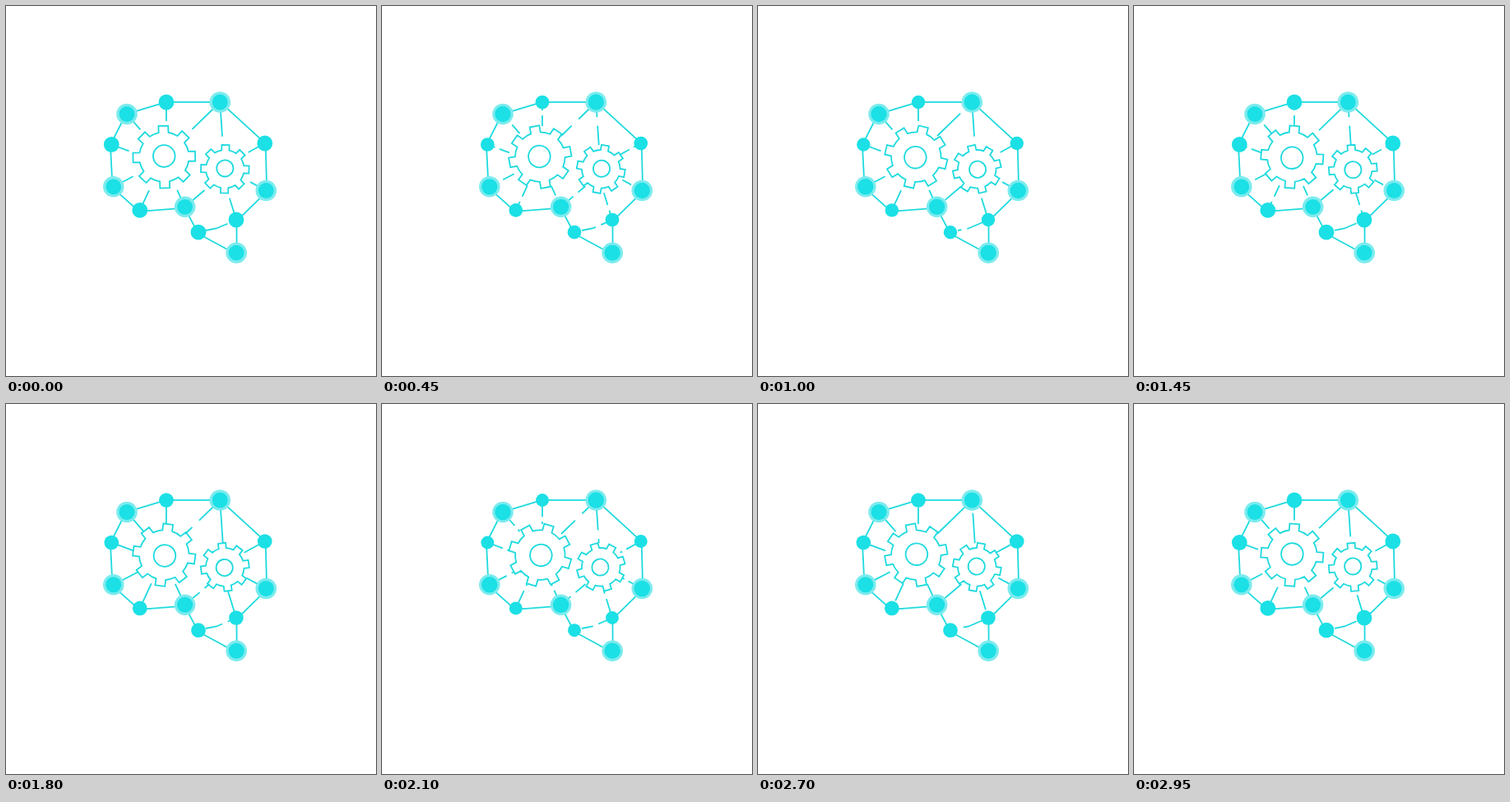
These frames come from a looping animation (450x450 px, 3000 ms). An HTML page with a canvas:

```html
<!DOCTYPE html>
<html lang="en">
<head>
<meta charset="utf-8">
<title>Brain network</title>
<style>
html, body { margin: 0; width: 100%; height: 100%; overflow: hidden; background: #fff; }
canvas { display: block; width: 450px; height: 450px; }
</style>
</head>
<body>
<canvas id="stage"></canvas>
<script>
const SIZE = 450, LOOP = 3000, STEP = 50, LEAD = 12, TAU = Math.PI * 2;
const COLOR = '#1be0e5', LINE_COLOR = '#1ddade', HALO = '#7cebee';
const LINE = 1.8, GAP = 0.2, FAST = 1000, SLOW = 1500;

const canvas = document.getElementById('stage');
const ctx = canvas.getContext('2d');
const dpr = window.devicePixelRatio || 1;
canvas.width = canvas.height = SIZE * dpr;

// Clockwise around the brain; even ones carry a halo, odd ones pulse
const nodes = [
  [147, 131.5], [195, 117], [260.3, 117], [314.8, 167],
  [316.3, 224.5], [280, 260], [280.2, 300.2], [234, 275.2],
  [217.6, 244.3], [162.8, 248.4], [130.8, 219.8], [128.3, 168.5]
];

// The outline runs slightly outside the node centres
const outline = nodes.map(([x, y]) => [x + (x - 240) * 0.012, y + (y - 130) * 0.012]);

// Nodes from "first" on are tied to the gear, arriving at these angles
const gears = [
  { x: 192.3, y: 183.6, tip: 37.8, root: 30.3, tooth: 11.8, hole: 13.3, shift: 1.1, dir: -1,
    first: 8, angles: [69, 114, 147, 188, 229, 274] },
  { x: 266.3, y: 198.3, tip: 29.2, root: 23.3, tooth: 9.2, hole: 10.1, shift: 0.9, dir: 1,
    first: 2, angles: [-95, -37, 27, 83] }
];

const slowLinks = [
  [nodes[2], [218, 158]],
  [nodes[8], [247.5, 219]],
  [[243, 273], [256, 270.5], [276, 262]]
];
const fastLinks = gears.flatMap(g => g.angles.map((deg, i) => {
  const a = deg * TAU / 360;
  return [nodes[(g.first + i) % nodes.length], [g.x + g.tip * Math.cos(a), g.y + g.tip * Math.sin(a)]];
}));

function tracePath(points) {
  ctx.beginPath();
  points.forEach(([x, y]) => ctx.lineTo(x, y));
}

function drawDisc(x, y, r, color) {
  ctx.fillStyle = color;
  ctx.beginPath();
  ctx.arc(x, y, r, 0, TAU);
  ctx.fill();
}

// A line with one gap travelling back towards its first point
function drawLink(points, phase) {
  const len = points.slice(1).reduce((sum, [x, y], i) =>
    sum + Math.hypot(x - points[i][0], y - points[i][1]), 0);
  ctx.setLineDash([len * (1 - GAP), len * GAP]);
  ctx.lineDashOffset = len * (phase % 1);
  tracePath(points);
  ctx.stroke();
  ctx.setLineDash([]);
}

function drawGear(g, t) {
  ctx.save();
  ctx.translate(g.x, g.y);
  ctx.rotate(g.dir * TAU * (t + LEAD) / LOOP);
  const half = g.tooth / 2, foot = Math.asin(half / g.root);
  ctx.beginPath();
  for (let i = 0; i < 8; i++) {
    const a = i * TAU / 8, c = Math.cos(a), s = Math.sin(a);
    for (const side of [-half, half]) {
      ctx.lineTo(c * g.tip - s * side, s * g.tip + c * side);
    }
    ctx.arc(0, 0, g.root, a + foot, a + TAU / 8 - foot);
  }
  ctx.closePath();
  ctx.stroke();
  ctx.beginPath();
  ctx.arc(0, -g.shift, g.hole, 0, TAU);
  ctx.stroke();
  ctx.restore();
}

function draw(t) {
  ctx.setTransform(dpr, 0, 0, dpr, 0, 0);
  ctx.fillStyle = '#fff';
  ctx.fillRect(0, 0, SIZE, SIZE);
  ctx.strokeStyle = LINE_COLOR;
  ctx.lineWidth = LINE;

  tracePath(outline);
  ctx.closePath();
  ctx.stroke();
  fastLinks.forEach(link => drawLink(link, t / FAST));
  slowLinks.forEach(link => drawLink(link, t / SLOW));
  gears.forEach(g => drawGear(g, t));

  const pulse = Math.cos(TAU * t / SLOW);
  nodes.forEach(([x, y], i) => {
    const haloed = i % 2 === 0;
    if (haloed) drawDisc(x, y, 12.8, HALO);
    drawDisc(x, y, haloed ? 9.6 - 0.2 * pulse : 8.6 + 0.8 * pulse, COLOR);
  });
}

const start = performance.now();
function frame() {
  const t = (performance.now() - start) % LOOP;
  draw(Math.floor(t / STEP) * STEP);
  requestAnimationFrame(frame);
}
frame();
</script>
</body>
</html>
```
